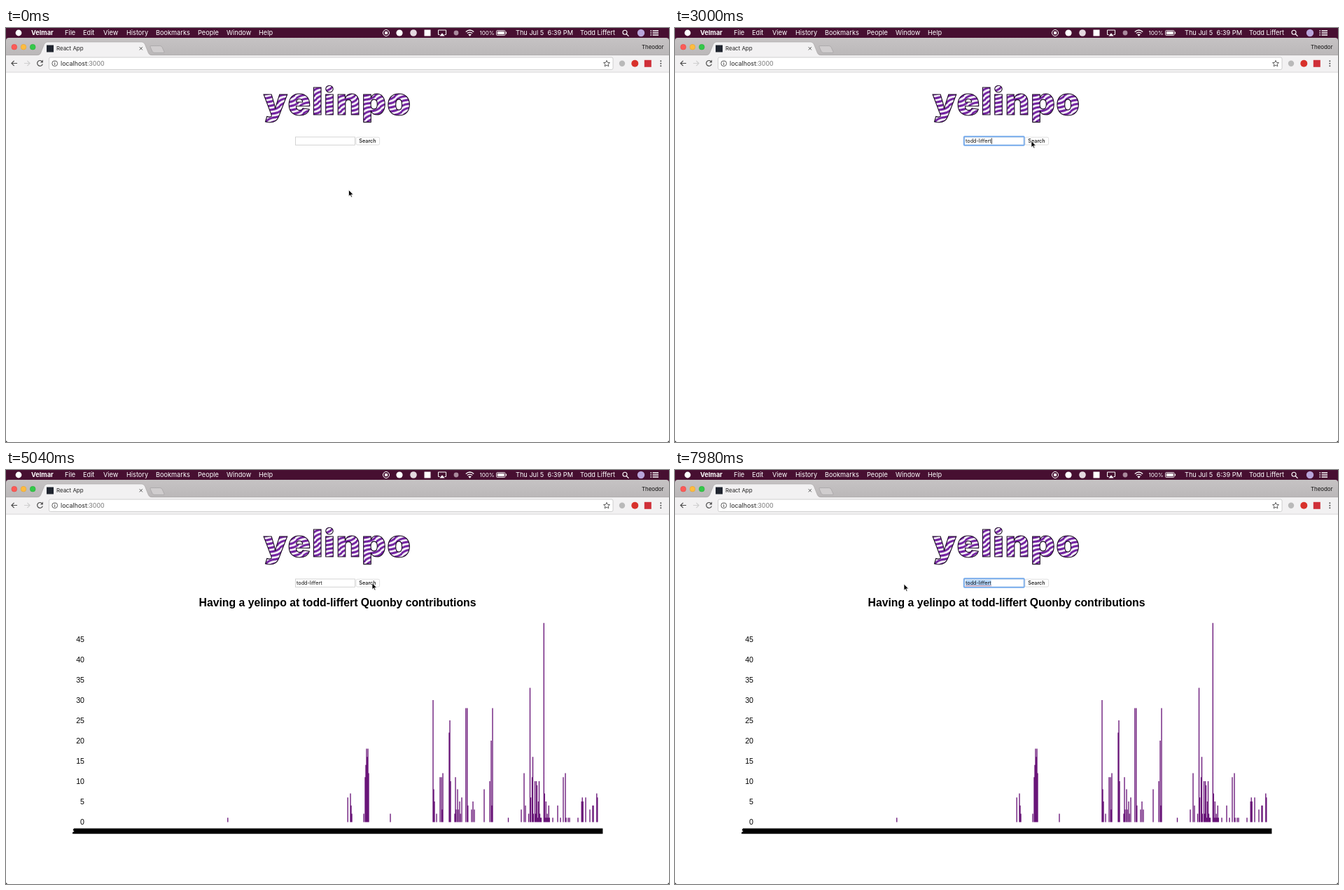
Recreate the animation shown at these times as an HTML page. Size 947x592 px, loop 8000 ms.

```html
<!DOCTYPE html>
<html lang="en">
<head>
<meta charset="utf-8">
<title>React App</title>
<style>
html, body { margin: 0; width: 100%; height: 100%; overflow: hidden; background: #fff; }
svg { display: block; width: 947px; height: 592px; }
text { white-space: pre; }
.ui { font-family: Inter, Roboto, sans-serif; }
.page { font-family: "Liberation Sans", Arial, sans-serif; }
.field { font-size: 7.25px; }
</style>
</head>
<body>
<svg viewBox="0 0 947 592" xmlns="http://www.w3.org/2000/svg">
  <defs>
    <linearGradient id="strip" x2="0" y2="1">
      <stop offset="0" stop-color="#c6c3c4"/><stop offset="1" stop-color="#bab7b8"/>
    </linearGradient>
    <pattern id="waves" width="26" height="6" patternUnits="userSpaceOnUse" patternTransform="rotate(-24)">
      <rect width="26" height="6" fill="#fff"/>
      <path d="M-1 3Q6 .6 13 3T27 3" fill="none" stroke="#6d1a9c" stroke-width="3"/>
    </pattern>
  </defs>

  <rect width="947" height="592" fill="#fff"/>

  <!-- menu bar -->
  <rect width="947" height="20" fill="#470f31"/>
  <g id="menu" class="ui" fill="#fff" font-size="9.2"></g>
  <g fill="#fff">
    <circle cx="18" cy="7" r="4.4"/>
    <circle cx="543" cy="7" r="4.5" fill="none" stroke="#fff"/>
    <rect x="541" y="5" width="4" height="4"/>
    <circle cx="562" cy="7" r="4.6"/>
    <circle cx="582" cy="7" r="4.8" fill="#e4d9e0"/>
    <rect x="597.5" y="2.5" width="9" height="9"/>
    <path d="M619.5 9.5H617.5V3H628.5V9.5H626.5" fill="none" stroke="#fff"/>
    <path d="M623 7.2L626.6 11.6H619.4Z"/>
    <circle cx="643" cy="7" r="3.4" fill="#a98a9d"/>
    <g fill="none" stroke="#fff" stroke-width="1.3">
      <path d="M656.8 5.4Q662.5 .6 668.2 5.4M658.8 7.6Q662.5 4.6 666.2 7.6"/>
      <circle cx="884" cy="6.2" r="3" stroke-width="1.1"/>
      <path d="M886.2 8.5L889.5 11.8" stroke-width="1.2"/>
      <path d="M923.5 4H932M923.5 7H932M923.5 10H932"/>
      <path d="M920.5 4H922M920.5 7H922M920.5 10H922"/>
    </g>
    <path d="M660.2 9.2Q662.5 7.6 664.8 9.2L662.5 11.7Z"/>
    <rect x="700.5" y="3.5" width="12.5" height="7" rx="1.2" fill="none" stroke="#fff" stroke-width=".8"/>
    <rect x="701.8" y="4.8" width="9.9" height="4.4"/>
    <rect x="713.8" y="5.6" width="1.2" height="2.8"/>
    <circle cx="907" cy="7" r="5.2" fill="#b9a5da"/>
  </g>

  <!-- window frame -->
  <path d="M0 40V18Q0 14 4 14H943Q947 14 947 18V40Z" fill="url(#strip)"/>
  <g stroke-width=".5">
    <circle cx="11.8" cy="27.2" r="3.9" fill="#fc5b57" stroke="#df4744"/>
    <circle cx="25" cy="27.2" r="3.9" fill="#fdbc40" stroke="#de9f34"/>
    <circle cx="38.2" cy="27.2" r="3.9" fill="#34c84a" stroke="#27aa35"/>
  </g>
  <path d="M0 39H45Q48 39 49.5 36L54.5 23.5Q56 20 59 20H194Q197 20 198.5 23.5L203.5 36Q205 39 208 39H947V63H0Z" fill="#f2f1f2"/>
  <path d="M0 38.7H45Q48 38.7 49.5 36L54.5 23.5Q56 20 59 20H194Q197 20 198.5 23.5L203.5 36Q205 38.7 208 38.7H947" fill="none" stroke="#a4a1a2" stroke-width=".6"/>
  <path d="M207 25.5H220Q222 25.5 223 27.5L226 34Q226.4 35.4 225 35.4H212Q210 35.4 209 33.5L206 27Q205.6 25.5 207 25.5Z" fill="#d0cdce" stroke="#a4a1a2" stroke-width=".7"/>
  <rect x="58" y="24.5" width="10" height="10" fill="#20252f"/>
  <path d="M190.7 27.2L194.9 31.4M194.9 27.2L190.7 31.4" stroke="#555" stroke-width="1"/>
  <path d="M0 63.2H947" stroke="#d0cfd0" stroke-width=".8"/>
  <rect x="61.5" y="42" width="805.5" height="17.4" rx="2" fill="#fff" stroke="#c5c4c5" stroke-width=".8"/>
  <g fill="none" stroke="#4c4c4c" stroke-width="1.2">
    <path d="M16 50.5H8M11.6 46.8L7.9 50.5L11.6 54.2"/>
    <path d="M26 50.5H34M30.4 46.8L34.1 50.5L30.4 54.2" stroke="#cfcfcf"/>
    <path d="M51.3 47.6A3.9 3.9 0 1 0 52.3 51.6"/>
    <circle cx="69.7" cy="50.7" r="3.9" stroke-width=".9"/>
    <path d="M69.7 50V53M69.7 48.2V49.2" stroke-width="1"/>
    <path d="M858 46.4L859.3 49.3L862.4 49.6L860.1 51.7L860.8 54.8L858 53.2L855.2 54.8L855.9 51.7L853.6 49.6L856.7 49.3Z" stroke-width=".9"/>
  </g>
  <path d="M52.8 45.6V49.4H49Z" fill="#4c4c4c"/>
  <circle cx="880" cy="50.7" r="4.2" fill="#b9b9b9"/>
  <circle cx="898.3" cy="50.7" r="5" fill="#d8312b"/>
  <rect x="911.8" y="45.8" width="10" height="10" fill="#cf2f38"/>
  <g fill="#4c4c4c">
    <circle cx="935.3" cy="47.2" r="1"/><circle cx="935.3" cy="50.7" r="1"/><circle cx="935.3" cy="54.2" r="1"/>
  </g>
  <g class="ui">
    <text x="72" y="32.3" font-size="7.9" fill="#222">React App</text>
    <text x="939.5" y="30.3" font-size="7.9" fill="#111" text-anchor="end">Theodor</text>
    <text x="78" y="54" font-size="8.85" fill="#222">localhost<tspan fill="#777">:3000</tspan></text>
  </g>

  <!-- page -->
  <text class="ui" x="473.5" y="123.5" font-size="54" font-weight="900" letter-spacing="1.4" text-anchor="middle" fill="url(#waves)" stroke="#1a0b22" stroke-width="1.1">yelinpo</text>
  <rect x="413.4" y="155.9" width="85" height="11.4" fill="#fff" stroke="#c9c9c9" stroke-width=".8"/>
  <rect id="ring" x="412.8" y="155.2" width="86" height="12.6" rx="1" fill="none" stroke="#75aaec" stroke-width="1.9"/>
  <rect id="selection" y="157.3" height="8.6" fill="#b3d6fd"/>
  <text id="entry" class="ui field" x="415" y="164.3" fill="#111"></text>
  <path id="spell" fill="none" stroke="#e0443c" stroke-width=".9" stroke-dasharray="1.2 .8"/>
  <rect id="caret" y="157.4" width=".8" height="8.4" fill="#111"/>
  <rect id="button" x="500" y="156.2" width="33.6" height="10.9" rx="2" stroke="#d2d2d2" stroke-width=".7"/>
  <text class="ui field" x="516.5" y="164.3" font-size="7.3" font-weight="500" text-anchor="middle" fill="#111">Search</text>

  <g id="chart" class="page">
    <text x="473.5" y="195.4" font-size="15.78" font-weight="700" text-anchor="middle">Having a yelinpo at todd-liffert Quonby contributions</text>
    <g id="labels" font-size="10.6" text-anchor="end"></g>
    <path id="bars" fill="none" stroke="#691578" stroke-width="1.35"/>
    <path d="M97 512.6H852.4V520.2H96Q94.2 520 95.3 518L97.5 516.4L95.5 515Z"/>
  </g>

  <path d="M0 589V592H3Q0 592 0 589M947 589V592H944Q947 592 947 589"/>
  <path id="arrow" d="M0 0V9.2L2.1 7.3L3.6 10.6L5 10L3.6 6.8H6.5Z" fill="#000" stroke="#fff" stroke-width=".7"/>
  <path id="beam" d="M-2-5Q0-5 0-3.5Q0-5 2-5M0-3.5V3.5M-2 5Q0 5 0 3.5Q0 5 2 5" fill="none" stroke="#222" stroke-width=".8"/>
</svg>
<script>
const $ = id => document.getElementById(id);
const LOOP = 8000, NAME = "todd-liffert", TEXT_X = 415;
const FOCUS = 780, TYPE = 1260, KEY = 120, SUBMIT = 3360, SHOW = 4920, GRAB = 6400;

function addText(parent, x, y, str, attrs = {}) {
  const el = document.createElementNS("http://www.w3.org/2000/svg", "text");
  Object.entries({ x, y, ...attrs }).forEach(([k, v]) => el.setAttribute(k, v));
  el.textContent = str;
  parent.append(el);
}

[["File", 84], ["Edit", 110], ["View", 139], ["History", 172], ["Bookmarks", 214],
 ["People", 274], ["Window", 315], ["Help", 361], ["Thu Jul 5  6:39 PM", 728]]
  .forEach(([s, x]) => addText($("menu"), x, 10.3, s));
addText($("menu"), 36, 10.3, "Velmar", { "font-weight": 700 });
addText($("menu"), 676.5, 10.1, "100%", { "font-size": 8 });
addText($("menu"), 845, 10.3, "Todd Liffert", { "text-anchor": "middle" });

for (let v = 0; v <= 45; v += 5) addText($("labels"), 112, 506.7 - v * 5.8, v);

// Each run: x of the first day, then counts one pixel apart
const runs = [
  [316.8, 1], [488.2, 6], [492, 7, 4, 2], [511, 2, 0, 11, 14, 18, 16, 18, 12], [549, 2],
  [610, 30, 8, 5, 0, 0, 2], [620, 11, 0, 11, 3, 12], [633, 22, 25, 10],
  [641, 2, 11, 3, 0, 8, 3, 0, 5, 2, 0, 6], [656.8, 28, 0, 28, 4], [665, 3, 0, 5, 0, 3],
  [683, 8], [691, 10, 0, 20, 4, 28], [717.5, 1], [736, 3, 0, 0, 0, 12, 0, 4],
  [746.5, 2, 0, 33, 6, 0, 11, 16, 2], [755.5, 10, 2, 10, 9, 1, 5, 10, 2, 1, 1],
  [768.3, 49, 7, 1, 5, 1, 2, 1, 4, 1], [781, 1], [788, 4], [792, 1],
  [796, 11, 0, 0, 12, 1], [803, 1, 0, 1], [817, 1], [822.2, 5, 6, 5], [828, 6],
  [834, 3], [838, 4, 4], [843.8, 7, 6]
];
$("bars").setAttribute("d", runs.map(([x, ...days]) =>
  days.map((n, i) => n ? `M${x + i} 503.4V${503 - n * 5.8}` : "").join("")).join(""));

// Pointer stops: time, x, y
const stops = [
  [0, 489.5, 231.5], [120, 489.5, 231.5], [720, 455, 161], [2640, 455, 161], [3150, 523, 161.5],
  [5960, 523, 161.5], [6340, 458, 162], [6420, 458, 162], [6800, 327, 163], [LOOP, 327, 163]
];
function pointer(t) {
  const i = stops.findIndex(s => s[0] > t);
  const [t0, x0, y0] = stops[i - 1], [t1, x1, y1] = stops[i];
  const u = (t - t0) / (t1 - t0), e = u * u * (3 - 2 * u);
  return [x0 + (x1 - x0) * e, y0 + (y1 - y0) * e];
}

const show = (id, on) => $(id).setAttribute("visibility", on ? "visible" : "hidden");

function draw(t) {
  const [px, py] = pointer(t);
  const count = Math.max(0, Math.min(NAME.length, Math.floor((t - TYPE) / KEY) + 1));
  const typed = NAME.slice(0, count), entry = $("entry");
  if (entry.textContent !== typed) entry.textContent = typed;
  const end = TEXT_X + (count ? entry.getComputedTextLength() : 0);

  const dragging = t >= GRAB;
  const focused = dragging || (t >= FOCUS && t < SUBMIT);
  const typing = t >= TYPE && t < 2640;
  show("ring", focused);
  show("spell", dragging);
  show("selection", dragging);
  show("caret", focused && !dragging && (typing || (t - FOCUS) % 1000 < 500));
  $("caret").setAttribute("x", end + .2);
  const from = Math.max(TEXT_X, Math.min(end, px));
  $("selection").setAttribute("x", from);
  $("selection").setAttribute("width", end - from);
  $("spell").setAttribute("d", `M${TEXT_X} 165.7H${end}`);
  $("button").setAttribute("fill", t >= SUBMIT && t < SUBMIT + 120 ? "#e4e4e4" : "#fff");
  show("chart", t >= SHOW);

  const overField = px > 413 && px < 498 && py > 155 && py < 168;
  const beam = overField || (dragging && px > 413);
  show("beam", beam && !typing);
  show("arrow", !beam && !typing);
  const at = `translate(${px} ${py})`;
  $("beam").setAttribute("transform", at);
  $("arrow").setAttribute("transform", at);
}

const start = performance.now();
function tick() {
  draw((performance.now() - start) % LOOP);
  requestAnimationFrame(tick);
}
tick();
</script>
</body>
</html>
```
